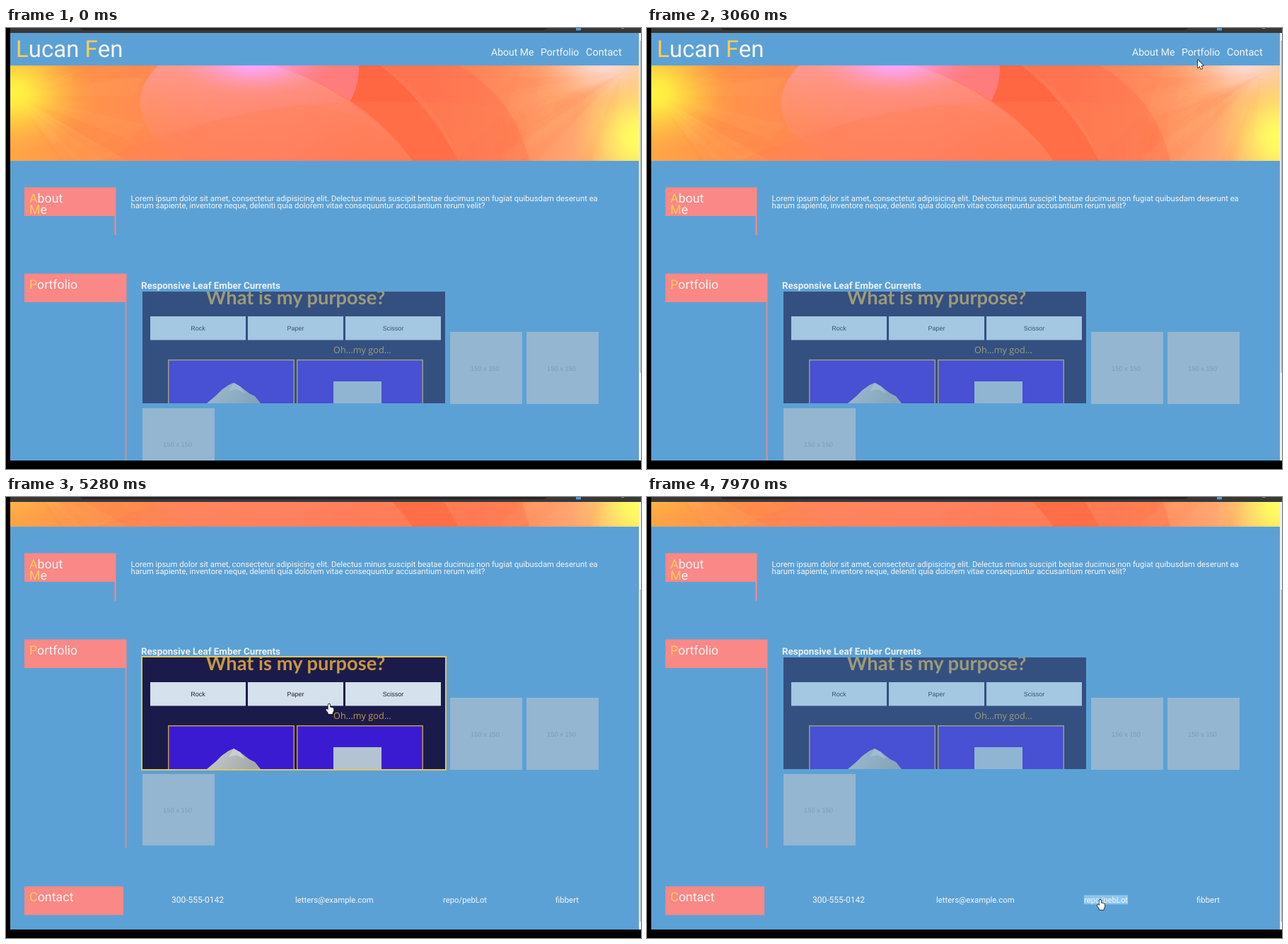
Recreate the animation shown at these times as an HTML page with a canvas. Size 898x624 px, loop 8000 ms.

```html
<!DOCTYPE html>
<html lang="en">
<head>
<meta charset="utf-8">
<title>Portfolio page</title>
<style>
html, body { margin: 0; width: 100%; height: 100%; overflow: hidden; background: #000; }
canvas { display: block; }
</style>
</head>
<body>
<canvas id="stage" width="898" height="624"></canvas>
<script>
const LOOP = 8000;
const MAX_SCROLL = 146;
const BLUE = '#5ca1d5', SALMON = '#fa8886', YELLOW = '#fdcd58', WHITE = '#f5f5f2';
const SANS = 'Roboto, sans-serif', ARIAL = '"Liberation Sans", Arial, sans-serif';
const OPEN = '"Open Sans", sans-serif';
const ctx = document.getElementById('stage').getContext('2d');

const clamp = v => Math.max(0, Math.min(1, v));
const smooth = v => { v = clamp(v); return v * v * (3 - 2 * v); };

function rect(c, x, y, w, h, fill) {
  c.fillStyle = fill;
  c.fillRect(x, y, w, h);
}

function text(c, str, x, y, font, fill, align = 'left') {
  c.font = font;
  c.textRendering = 'geometricPrecision';
  c.textAlign = align;
  c.fillStyle = fill;
  c.fillText(str, x, y);
}

// Each word starts with a yellow capital.
function capText(str, x, y, size) {
  const font = size + 'px ' + SANS;
  for (const word of str.split(' ')) {
    text(ctx, word[0], x, y, font, YELLOW);
    x += ctx.measureText(word[0]).width;
    text(ctx, word.slice(1), x, y, font, WHITE);
    x += ctx.measureText(word.slice(1) + ' ').width;
  }
}

function layer(x, y, w, h, paint) {
  const cv = document.createElement('canvas');
  cv.width = w;
  cv.height = h;
  const c = cv.getContext('2d');
  c.translate(-x, -y);
  paint(c);
  return cv;
}

function shape(c, path, fill) {
  c.fillStyle = fill;
  c.fill(new Path2D(path));
}

// Soft elliptical light
function glow(c, x, y, rx, ry, rgb, strength = 1) {
  const g = c.createRadialGradient(0, 0, 0, 0, 0, 1);
  [1, 0.88, 0.58, 0.3, 0.1, 0].forEach((a, i) => g.addColorStop(i / 5, `rgba(${rgb},${a * strength})`));
  c.save();
  c.translate(x, y);
  c.scale(rx, ry);
  rect(c, -1, -1, 2, 2, g);
  c.restore();
}

function random(seed) {
  return () => (seed = (seed * 16807) % 2147483647) / 2147483647;
}

// Fan of faint wedges around a point
function fan(c, x, y, from, to, count, seed) {
  const rnd = random(seed);
  for (let i = 0; i < count; i++) {
    const a = from + (to - from) * rnd(), r = 70 + 160 * rnd(), w = 0.1 + 0.2 * rnd();
    c.beginPath();
    c.moveTo(x, y);
    c.lineTo(x + r * Math.cos(a), y + r * Math.sin(a));
    c.lineTo(x + r * 0.9 * Math.cos(a + w), y + r * 0.9 * Math.sin(a + w));
    c.fillStyle = i % 2 ? 'rgba(255,205,130,.06)' : 'rgba(255,110,60,.06)';
    c.fill();
  }
}

const banner = layer(6, 53, 889, 135, c => {
  const g = c.createLinearGradient(6, 0, 895, 0);
  ['#ffa546', '#ff954a', '#ff8a52', '#ff8462', '#ff8064', '#ff7854',
   '#ff7a54', '#ff8a5c', '#ffa46e', '#ffc478'].forEach((col, i) => g.addColorStop(i / 9, col));
  rect(c, 6, 53, 889, 135, g);
  // sheet left of the long curve, lighter towards the top
  const sheet = c.createLinearGradient(0, 53, 0, 188);
  sheet.addColorStop(0, 'rgba(255,160,175,.65)');
  sheet.addColorStop(0.5, 'rgba(255,150,135,.4)');
  sheet.addColorStop(1, 'rgba(255,125,95,.2)');
  shape(c, 'M215 53H380Q500 92 575 188H250Q150 120 215 53Z', sheet);
  shape(c, 'M380 53Q440 72 487 103Q500 80 499 53Z', 'rgba(255,125,150,.6)');
  shape(c, 'M499 53Q500 80 487 103Q540 138 575 188H640Q600 110 530 53Z', 'rgba(255,92,58,.65)');
  shape(c, 'M530 53Q605 95 640 188H740Q720 100 640 53Z', 'rgba(255,105,70,.35)');
  shape(c, 'M130 188Q300 118 425 108Q520 122 575 188Z', 'rgba(255,128,85,.4)');
  shape(c, 'M425 108Q560 98 720 112Q660 150 640 188H575Q520 125 425 108Z', 'rgba(255,130,85,.25)');
  fan(c, 12, 95, -0.6, 0.8, 18, 41);
  fan(c, 870, 65, 1.7, 3.0, 24, 77);
  glow(c, 350, 48, 115, 48, '255,165,255');
  glow(c, 6, 92, 120, 85, '255,245,65');
  glow(c, 845, 46, 105, 65, '255,222,228', 0.9);
  glow(c, 895, 155, 95, 95, '255,255,95');
});

const game = layer(193, 373, 428, 158, c => {
  rect(c, 193, 373, 428, 158, '#1b1b4b');
  text(c, 'What is my purpose?', 409.5, 391, 'bold 27.3px Lato, sans-serif', '#c8983e', 'center');
  ['Rock', 'Paper', 'Scissor'].forEach((label, i) => {
    const x = 204 + i * 138;
    rect(c, x, 408, 135, 33.5, '#d5e1ec');
    text(c, label, x + 67.5, 428.3, '9px ' + ARIAL, '#22222c', 'center');
  });
  text(c, 'Oh...my god...', 463, 460, '12.7px ' + OPEN, '#c8983e');
  for (const x of [229, 411]) {
    rect(c, x, 469, 179, 70, '#c59a48');
    rect(c, x + 1.5, 470.5, 176, 70, '#3b1bd2');
  }
  const g = c.createLinearGradient(300, 502, 345, 531);
  g.addColorStop(0, '#c2c5c5');
  g.addColorStop(1, '#a4a9aa');
  shape(c, 'M284 531L297 520L305 512L315 505L322 502L331 507L344 517L352 521L360 531Z', g);
  shape(c, 'M322 502L331 507L338 517L326 511L315 514Z', '#cccfcf');
  shape(c, 'M463 500H531V531H463Z', '#b4c3d1');
});

const tile = layer(0, 0, 102, 102, c => {
  rect(c, 0, 0, 102, 102, '#cccccc');
  text(c, '150 x 150', 49.5, 55.3, '9.3px ' + ARIAL, '#969696', 'center');
});

const links = [
  ['About Me', 686, 39, 14], ['Portfolio', 756, 39, 14.1], ['Contact', 820, 39, 14.5],
  ['300-555-0142', 234, 719.5, 12], ['letters@example.com', 409, 719.5, 11.4],
  ['repo/pebLot', 618, 719.5, 11.3], ['fibbert', 777, 719.5, 11.4]
];

// Placeholders: x, y, hover start, hover end
const tiles = [[628, 430, 5970, 6190], [736, 430, 6250, 6610], [193, 537.5, 6900, 7130]];
const gameHover = [5000, 5970];

// Pointer: time, x, y
const moves = [
  [130, 862, 550], [500, 800, 260], [870, 725, 47], [1070, 720, 45], [1150, 716, 34],
  [1270, 722, 33], [1400, 785, 34], [1560, 845, 34], [1760, 720, 32], [1900, 713, 28],
  [2800, 713, 28], [2960, 750, 46], [3060, 779, 45], [3190, 782, 38], [3600, 788, 34],
  [3900, 792, 39], [4240, 792, 39], [4400, 846, 36], [4700, 846, 36], [5150, 457, 293],
  [5680, 457, 293], [5970, 626, 330], [6090, 699, 341], [6330, 785, 338], [6540, 778, 345],
  [6750, 563, 460], [6900, 292, 470], [7010, 248, 450], [7130, 296, 492], [7340, 365, 570],
  [7500, 430, 571], [7680, 525, 571], [7870, 641, 570]
];

// Scroll: start, end, from, to
const scrolls = [
  [1930, 2330, 0, 1], [2690, 2960, 1, 0], [3953, 4213, 0, 1], [4215, 4285, 1, 0], [4560, 4880, 0, 1]
];

const FILE = 'file:///C:/Users/morel/Documents/PebLot/Sandbox/profProfile/index.html#';
const status = [
  [1120, 1320, FILE + 'abou...'], [1320, 1480, FILE + 'port...'], [1480, 1680, FILE + 'cont...'],
  [1680, 2020, FILE + 'abou...'], [3190, 4150, FILE + 'port...'], [4330, 4680, FILE + 'cont...'],
  [5700, 6290, 'https://crinklethistle.peblot.io/RPS/']
];

const inside = (t, a, b) => t >= a && t < b;
const hoverAmount = (t, a, b) => clamp((t - a) / 200) - clamp((t - b) / 200);

function scrollAt(t) {
  let s = 0;
  for (const [a, b, from, to] of scrolls) {
    if (t >= a) s = from + (to - from) * smooth((t - a) / (b - a));
  }
  return s * MAX_SCROLL;
}

function pointerAt(t) {
  if (t < moves[0][0]) return null;
  const i = moves.findIndex(m => m[0] > t);
  if (i < 0) return moves[moves.length - 1].slice(1);
  const [t0, x0, y0] = moves[i - 1], [t1, x1, y1] = moves[i];
  const k = smooth((t - t0) / (t1 - t0));
  return [x0 + (x1 - x0) * k, y0 + (y1 - y0) * k];
}

function drawPicture(img, x, y, w, h, base, t, a, b) {
  if (inside(t, a, b)) rect(ctx, x - 2, y - 2, w + 4, h + 4, '#e0c65c');
  rect(ctx, x, y, w, h, BLUE);
  ctx.globalAlpha = base + (1 - base) * hoverAmount(t, a, b);
  ctx.drawImage(img, 0, 0, w, h, x, y, w, h);
  ctx.globalAlpha = 1;
}

// Returns true when the pointer is over a link.
function drawLinks(p, scroll) {
  let over = false;
  for (const [label, x, y, size] of links) {
    ctx.font = size + 'px ' + SANS;
    const w = ctx.measureText(label).width;
    const top = y - size * 0.9, h = size * 1.15;
    if (p && p[0] >= x && p[0] <= x + w && inside(p[1] + scroll, top, top + h)) {
      over = true;
      rect(ctx, x, top, w, h, '#8ec6ef');
    }
    text(ctx, label, x, y, size + 'px ' + SANS, WHITE);
  }
  return over;
}

function drawPage(t, p, scroll) {
  ctx.save();
  ctx.beginPath();
  ctx.rect(6, 7, 889, 605);
  ctx.clip();
  rect(ctx, 6, 7, 889, 605, BLUE);
  ctx.translate(0, -scroll);

  capText('Lucan Fen', 14, 41, 33);
  ctx.drawImage(banner, 6, 53);

  rect(ctx, 26, 225.5, 129.5, 40.5, SALMON);
  rect(ctx, 153.5, 266, 2, 27, SALMON);
  capText('About', 33, 246.8, 17.8);
  capText('Me', 33, 263.4, 17.8);
  const body = '11.29px ' + SANS;
  text(ctx, 'Lorem ipsum dolor sit amet, consectetur adipisicing elit. Delectus minus suscipit beatae ducimus non fugiat quibusdam deserunt ea', 176.5, 244.5, body, WHITE);
  text(ctx, 'harum sapiente, inventore neque, deleniti quia dolorem vitae consequuntur accusantium rerum velit?', 176.5, 255.4, body, WHITE);

  rect(ctx, 26, 347.5, 144.5, 40.5, SALMON);
  rect(ctx, 168.5, 388, 2, 254.5, '#d98b98');
  capText('Portfolio', 33, 368.5, 17.6);
  text(ctx, 'Responsive Leaf Ember Currents', 191, 369, 'bold 13.4px ' + SANS, '#ecefef');
  drawPicture(game, 193, 373, 428, 158, 0.6, t, ...gameHover);
  for (const [x, y, a, b] of tiles) drawPicture(tile, x, y, 101.5, 101.5, 0.5, t, a, b);

  rect(ctx, 26, 697, 140, 40.5, SALMON);
  capText('Contact', 33, 718.3, 17.9);
  const over = drawLinks(p, scroll);
  ctx.restore();
  return over;
}

function drawBrowser(t, scroll) {
  rect(ctx, 895, 7, 3, 605, '#eef0f1');
  rect(ctx, 896.5, 18 + scroll * 113 / MAX_SCROLL, 1.5, 470, '#b9bcbe');
  rect(ctx, 6, 0, 892, 7, '#383839');
  ctx.fillStyle = '#242426';
  ctx.beginPath();
  ctx.roundRect(104, -12, 662, 15, 6);
  ctx.fill();
  rect(ctx, 806, 0, 7, 3.5, '#4a9be0');
  rect(ctx, 870, 0, 4, 1, '#8a8a8c');

  const s = status.find(([a, b]) => inside(t, a, b));
  if (!s) return;
  const font = '7.8px ' + OPEN;
  ctx.font = font;
  const w = ctx.measureText(s[2]).width + 7;
  ctx.fillStyle = '#2f3033';
  ctx.beginPath();
  ctx.roundRect(6, 597.5, w, 14.5, [0, 3, 0, 0]);
  ctx.fill();
  text(ctx, s[2], 9, 607.8, font, '#cfd0d2');
}

const ARROW = new Path2D('M0 0V11.3L2.6 8.9L4.3 12.9L6.1 12.1L4.4 8.3H7.9Z');
const HAND = new Path2D('M-1.3 .6Q0 -.8 1.2 .6V4.8L2.4 4.6L3.6 5.2L4.9 5.2L6.2 6V10L4.8 12.2V14H-1.2V12.4L-4.4 8.2Q-4.2 6.6 -2.6 7.3L-1.3 8.6Z');

function drawPointer([x, y], hand) {
  ctx.save();
  ctx.translate(x, y);
  const path = hand ? HAND : ARROW;
  ctx.lineWidth = 1.6;
  ctx.lineJoin = 'round';
  ctx.strokeStyle = '#16202c';
  ctx.stroke(path);
  ctx.fillStyle = '#fff';
  ctx.fill(path);
  ctx.restore();
}

function draw(t) {
  const scroll = scrollAt(t), p = pointerAt(t);
  rect(ctx, 0, 0, 898, 624, '#000');
  const over = drawPage(t, p, scroll);
  drawBrowser(t, scroll);
  if (p) drawPointer(p, over || inside(t, ...gameHover));
}

const start = performance.now();
function tick() {
  draw((performance.now() - start) % LOOP);
  requestAnimationFrame(tick);
}
tick();
</script>
</body>
</html>
```
